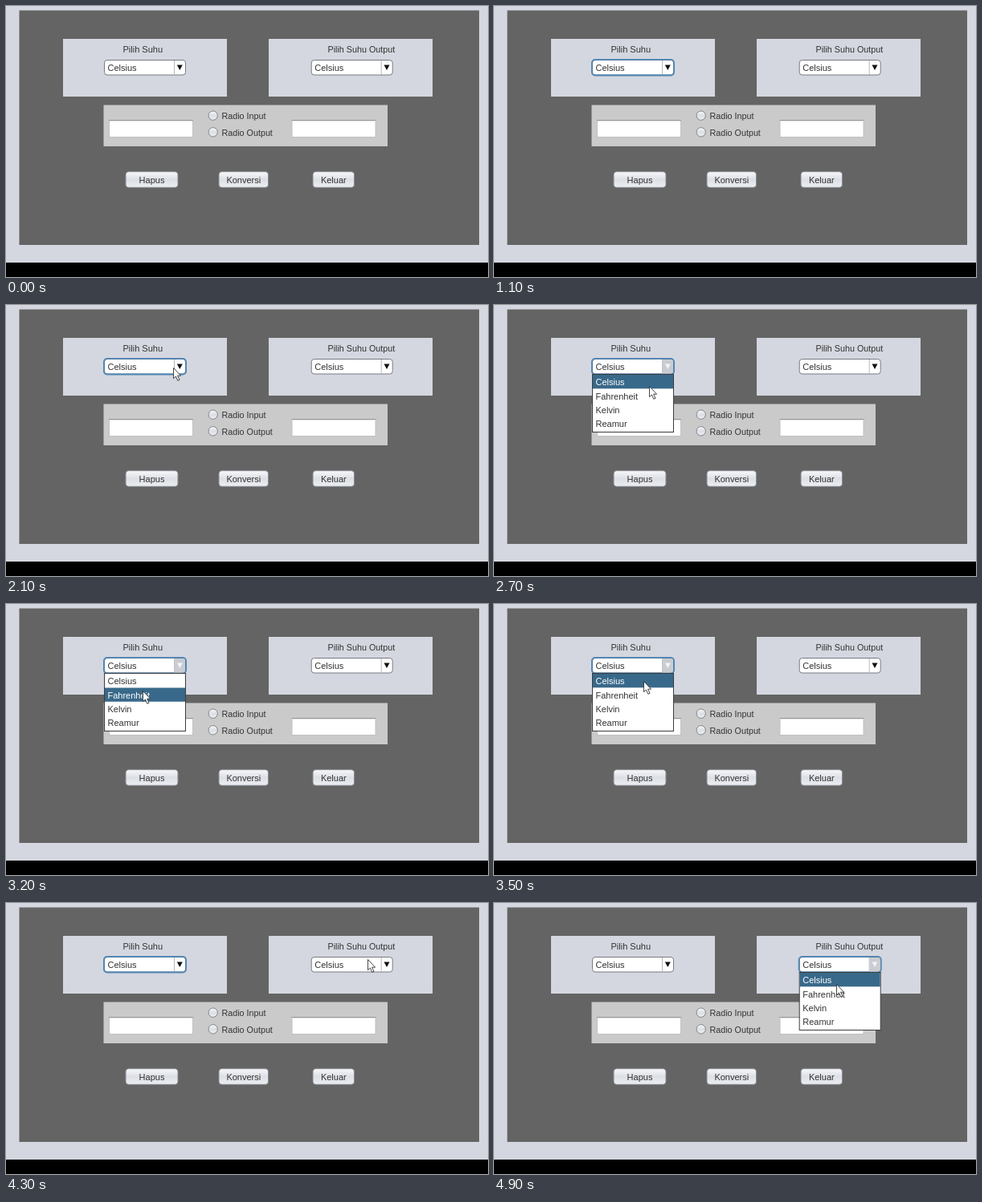
These frames come from a looping animation (600x338 px, 5 s). An HTML page:

```html
<!DOCTYPE html>
<html lang="id">
<head>
<meta charset="utf-8">
<title>Konversi Suhu</title>
<style>
html, body { margin: 0; width: 100%; height: 100%; overflow: hidden; background: #000; }
svg { display: block; width: 600px; height: 338px; }
text { font: 11px "Liberation Sans", Arial, sans-serif; fill: #333; }
.long { font-size: 10.75px; }
.mid { text-anchor: middle; }
.hit text { fill: #fff; }

.anim { animation: 5s step-end infinite; }
#focusA { animation-name: focusA; }
#focusB, #popB { animation-name: openB; }
#popA { animation-name: openA; }
#rowC { animation-name: rowC; }
#rowF { animation-name: rowF; }
#show { animation-name: show; }
#cursor { animation: move 5s linear infinite; }

@keyframes focusA { 0% { opacity: 0 } 22% { opacity: 1 } 88%, 100% { opacity: 0 } }
@keyframes openA { 0% { opacity: 0 } 46% { opacity: 1 } 76%, 100% { opacity: 0 } }
@keyframes openB { 0% { opacity: 0 } 88%, 100% { opacity: 1 } }
@keyframes rowC { 0% { opacity: 1 } 58% { opacity: 0 } 66%, 100% { opacity: 1 } }
@keyframes rowF { 0% { opacity: 0 } 58% { opacity: 1 } 66%, 100% { opacity: 0 } }
@keyframes show { 0% { opacity: 0 } 26%, 100% { opacity: 1 } }

/* the pointer advances in tenths of a second */
@keyframes move {
  0%, 30% { transform: translate(285px, 36px); animation-timing-function: steps(4); }
  38% { transform: translate(208px, 84px); animation-timing-function: steps(2); }
  42%, 50% { transform: translate(208px, 78px); animation-timing-function: steps(2); }
  54% { transform: translate(193px, 101px); animation-timing-function: steps(4); }
  62% { transform: translate(168px, 112px); animation-timing-function: steps(1); }
  64% { transform: translate(170px, 108px); animation-timing-function: steps(3); }
  70%, 76% { transform: translate(186px, 96px); animation-timing-function: steps(5); }
  86%, 94% { transform: translate(450px, 70px); animation-timing-function: steps(2); }
  98%, 100% { transform: translate(426px, 101px); }
}
</style>
</head>
<body>
<svg viewBox="0 0 600 338">
  <defs>
    <linearGradient id="metal" x2="0" y2="1">
      <stop offset="0" stop-color="#f7f8fa"/>
      <stop offset=".5" stop-color="#dcdfe5"/>
      <stop offset="1" stop-color="#eceef2"/>
    </linearGradient>
    <g id="arrow"><path d="M212.8 73.5h7l-3.5 6.5z"/></g>
    <g id="combo">
      <rect x="122.5" y="67.5" width="101" height="18.5" rx="3.5" fill="#fff" stroke="#777b82"/>
      <path d="M209.5 68v17.5" stroke="#b4b8be"/>
      <use href="#arrow" fill="#111"/>
      <text x="126.5" y="81">Celsius</text>
    </g>
    <rect id="ring" x="121.9" y="66.9" width="102.2" height="19.6" rx="4" fill="none" stroke="#4f86b5" stroke-width="1.8"/>
    <g id="popup">
      <path d="M209.5 68h10.5q3 0 3 3v11.5q0 3-3 3h-10.5z" fill="#c9ccd2"/>
      <use href="#arrow" fill="#f2f3f5"/>
      <rect x="122.5" y="86.5" width="101" height="72" fill="#fff" stroke="#3c3c3c"/>
      <text x="126.5" y="100">Celsius</text>
      <text x="126.5" y="117.5">Fahrenheit</text>
      <text x="126.5" y="135">Kelvin</text>
      <text x="126.5" y="152">Reamur</text>
    </g>
    <g id="hitC" class="hit">
      <rect x="123" y="87" width="100" height="17.3" fill="#39698a"/>
      <text x="126.5" y="100">Celsius</text>
    </g>
    <g id="hitF" class="hit">
      <rect x="123" y="104.5" width="100" height="17.3" fill="#39698a"/>
      <text x="126.5" y="117.5">Fahrenheit</text>
    </g>
    <g id="field">
      <rect x="128.5" y="142.5" width="104" height="21" fill="#fff" stroke="#bfc1c5"/>
      <path d="M128 142.5h105" stroke="#96989c"/>
      <path d="M129 143.5h103" stroke="#dfe0e2"/>
    </g>
    <circle id="radio" cx="257.7" r="5.7" fill="url(#metal)" stroke="#808388"/>
  </defs>

  <rect width="600" height="320" fill="#d4d7df"/>
  <rect x="16.5" y="5.5" width="572.5" height="292.5" fill="#646464"/>
  <rect x="71" y="41" width="204" height="72" fill="#d4d7df"/>
  <rect x="327" y="41" width="204" height="72" fill="#d4d7df"/>
  <rect x="121.5" y="123.5" width="353.5" height="51.5" fill="#cacaca"/>

  <text x="145.5" y="57.5">Pilih Suhu</text>
  <text x="400.5" y="57.5" class="long">Pilih Suhu Output</text>

  <use href="#field"/>
  <use href="#field" x="227.5"/>
  <use href="#radio" y="136.7"/>
  <use href="#radio" y="157.3"/>
  <text x="268.5" y="141" class="long">Radio Input</text>
  <text x="268.5" y="161.7" class="long">Radio Output</text>

  <g fill="url(#metal)" stroke="#85898f">
    <rect x="149" y="206.7" width="65" height="19.6" rx="3.5"/>
    <rect x="265" y="206.7" width="61.5" height="19.6" rx="3.5"/>
    <rect x="382" y="206.7" width="51.5" height="19.6" rx="3.5"/>
  </g>
  <g class="mid">
    <text x="181.5" y="221">Hapus</text>
    <text x="295.8" y="221">Konversi</text>
    <text x="407.8" y="221">Keluar</text>
  </g>

  <use href="#combo"/>
  <use href="#combo" x="257.7"/>
  <use href="#ring" id="focusA" class="anim"/>
  <g id="popA" class="anim">
    <use href="#popup"/>
    <use href="#hitC" id="rowC" class="anim"/>
    <use href="#hitF" id="rowF" class="anim"/>
  </g>
  <use href="#ring" x="257.7" id="focusB" class="anim"/>
  <g id="popB" class="anim">
    <use href="#popup" x="257.7"/>
    <use href="#hitC" x="257.7"/>
  </g>

  <g id="show" class="anim">
    <path id="cursor" d="M.5.5v13.2l2.9-2.7 2.4 5.3 2.2-1-2.4-5.1h4z" fill="#fff" stroke="#333" stroke-width=".9"/>
  </g>
</svg>
</body>
</html>
```
